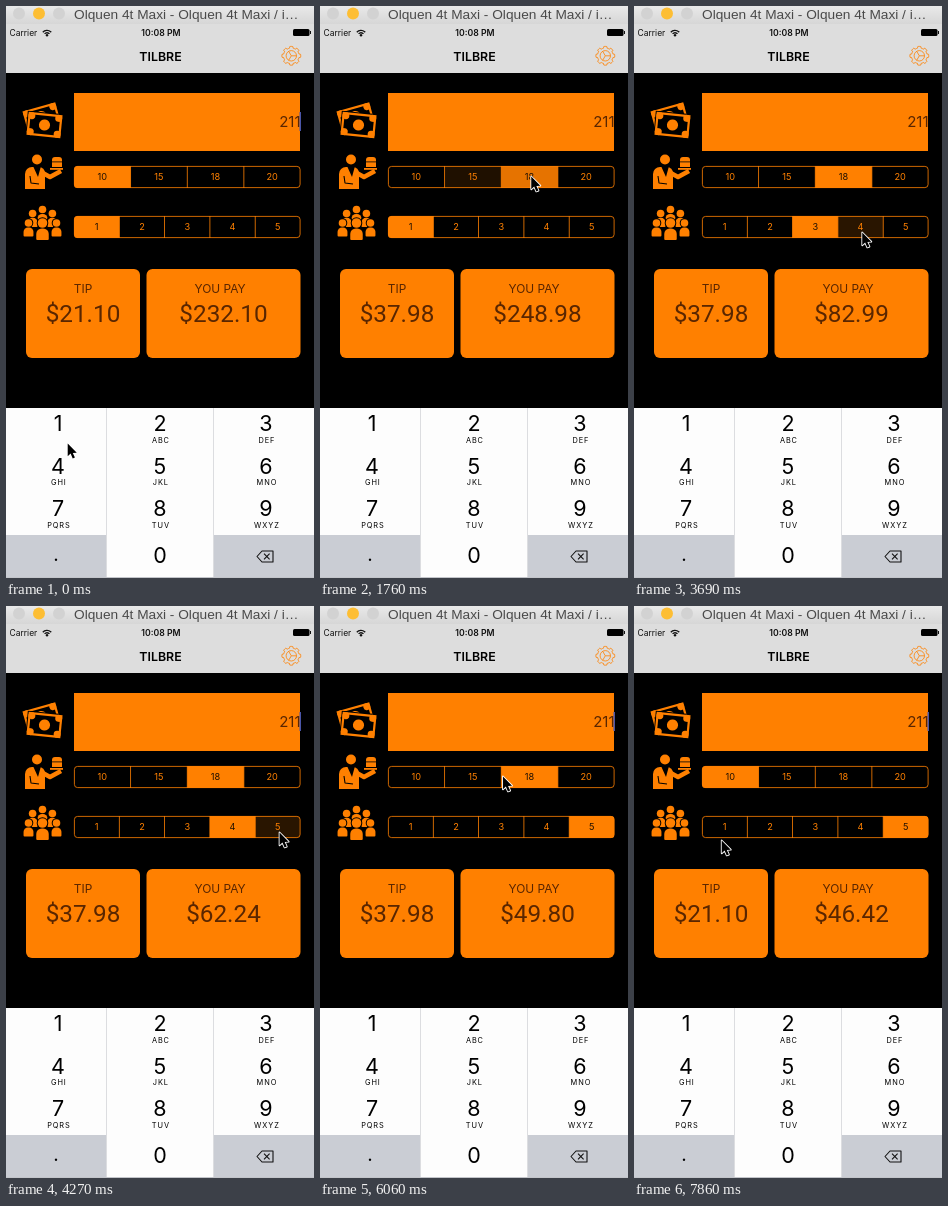
Recreate the animation shown at these times as an HTML page with a canvas. Size 308 px wide and 572 px high, loop 8000 ms.

```html
<!DOCTYPE html>
<html lang="en">
<head>
<meta charset="utf-8">
<title>Tip calculator</title>
<style>
html, body { margin: 0; width: 100%; height: 100%; overflow: hidden; background: #000; }
canvas { display: block; width: 308px; height: 572px; }
</style>
</head>
<body>
<canvas id="stage" width="308" height="572"></canvas>
<script>
const ctx = document.getElementById('stage').getContext('2d');
const TAU = Math.PI * 2;
const ORANGE = '#ff8000', BROWN = '#5a2600';
const SANS = 'Inter, Roboto, sans-serif';
const LOOP = 8000, STEPS = 54, BILL = 211;
const LEFT = 68, WIDTH = 226.5, CELL_H = 22;

const TIP = { y: 160, options: [10, 15, 18, 20] };
const SPLIT = { y: 210, options: [1, 2, 3, 4, 5] };
const START = { x: 61, y: 436 }, END = { x: 87, y: 233 };

// step of the press, control, chosen option; the release is one step later
const TAPS = [
  [6, TIP, 15], [11, TIP, 18], [16, SPLIT, 2], [21, SPLIT, 3], [25, SPLIT, 4],
  [29, SPLIT, 5], [34, TIP, 20], [39, TIP, 18], [43, TIP, 15], [47, TIP, 10]
];

function rect(x, y, w, h, color) {
  ctx.fillStyle = color;
  ctx.fillRect(x, y, w, h);
}

function round(x, y, w, h, r, color) {
  ctx.beginPath();
  ctx.roundRect(x, y, w, h, r);
  if (color) {
    ctx.fillStyle = color;
    ctx.fill();
  }
}

function disc(x, y, r, color = ORANGE) {
  ctx.beginPath();
  ctx.arc(x, y, r, 0, TAU);
  ctx.fillStyle = color;
  ctx.fill();
}

function trace(points) {
  ctx.beginPath();
  points.forEach(([x, y]) => ctx.lineTo(x, y));
}

function poly(points, color) {
  trace(points);
  ctx.closePath();
  ctx.fillStyle = color;
  ctx.fill();
}

function stroke(color, width) {
  ctx.strokeStyle = color;
  ctx.lineWidth = width;
  ctx.stroke();
}

function line(points, color, width) {
  trace(points);
  stroke(color, width);
}

function text(str, x, y, size, color, { weight = 400, align = 'center', family = SANS, gap = 0 } = {}) {
  ctx.font = `${weight} ${size}px ${family}`;
  ctx.letterSpacing = gap + 'px';
  ctx.textAlign = align;
  ctx.fillStyle = color;
  ctx.fillText(str, x, y);
}

function titleBar() {
  const g = ctx.createLinearGradient(0, 0, 0, 18);
  g.addColorStop(0, '#e9e9e9');
  g.addColorStop(1, '#d6d6d6');
  rect(0, 0, 308, 18, g);
  for (let i = 0; i < 3; i++) disc(13 + i * 20, 7.5, 6, i === 1 ? '#fdbe34' : '#d2d2d2');
  text('Olquen 4t Maxi - Olquen 4t Maxi / i…', 68, 13, 13.7, '#4a4a4a',
    { align: 'left', family: '"Liberation Sans", Arial, sans-serif' });
}

function statusBar() {
  rect(0, 18, 308, 49, '#dddddd');
  text('Carrier', 3.5, 30, 8.5, '#111', { align: 'left' });
  for (const r of [3.2, 5.6]) {
    ctx.beginPath();
    ctx.arc(41, 30, r, -TAU * 0.385, -TAU * 0.115);
    stroke('#111', 1.3);
  }
  disc(41, 29.3, 1.2, '#111');
  text('10:08 PM', 155, 30, 8.7, '#111', { weight: 600 });
  round(287, 23, 16.5, 7, 1.5, '#000');
  rect(304, 25, 1, 3, '#111');
  text('TILBRE', 154.5, 55, 12.4, '#000', { weight: 600 });
}

function gear() {
  const at = (r, a) => [285.3 + r * Math.cos(a), 49.8 + r * Math.sin(a)];
  const teeth = Array.from({ length: 161 }, (_, i) => {
    const a = i / 160 * TAU;
    return at(8.6 + 0.8 * Math.tanh(6 * Math.cos(a * 8)), a);
  });
  line(teeth, ORANGE, 0.9);
  ctx.beginPath();
  ctx.arc(285.3, 49.8, 5.2, 0, TAU);
  stroke(ORANGE, 0.8);
  for (let i = 0; i < 3; i++) line([at(0, 0), at(5.2, i * TAU / 3)], ORANGE, 0.8);
}

function note(x, y, w, h, turn) {
  ctx.save();
  ctx.translate(x, y);
  ctx.rotate(turn);
  rect(-w / 2 - 1, -h / 2 - 1, w + 2, h + 2, '#000');
  rect(-w / 2, -h / 2, w, h, ORANGE);
  rect(-w / 2 + 2.2, -h / 2 + 2.2, w - 4.4, h - 4.4, '#000');
  for (const sx of [-1, 1]) for (const sy of [-1, 1])
    disc(sx * (w / 2 - 3.5), sy * (h / 2 - 3.5), 3.5);
  disc(0, 0, 5.6);
  ctx.restore();
}

function waiter() {
  disc(31, 153.5, 5);
  round(19, 161, 20, 22, [7, 6, 0, 0], ORANGE);
  poly([[27, 160], [35, 160], [32, 171]], '#000');
  line([[24, 170], [25, 177], [33, 178]], '#000', 1.1);
  line([[35, 166], [44, 171], [55, 165]], ORANGE, 4.5);
  rect(44, 162, 13, 1.8, ORANGE);
  round(46, 151, 10, 10, [3, 3, 0, 0], ORANGE);
  rect(46, 155.5, 10, 0.8, '#000');
}

function person(x, y, r) {
  const w = r * 2.6, h = r * 2.4;
  round(x - w / 2 - 1.2, y + r - 0.6, w + 2.4, h + 1.2, w / 2, '#000');
  disc(x, y, r + 1, '#000');
  round(x - w / 2, y + r + 0.6, w, h, [w * 0.45, w * 0.45, 1, 1], ORANGE);
  disc(x, y, r);
}

function crowd() {
  // five people on an arc behind the one in front
  for (const a of [2, 1, 3, 0, 4])
    person(36.5 - 14 * Math.cos(a * TAU / 8), 217 - 13.5 * Math.sin(a * TAU / 8), 3.8);
  person(36.5, 217, 4.8);
}

const cellCenter = (control, i) => LEFT + (i + 0.5) * WIDTH / control.options.length;

function segments(control, fills) {
  const { y, options } = control, cell = WIDTH / options.length;
  ctx.save();
  round(LEFT, y, WIDTH, CELL_H, 3.5);
  ctx.clip();
  fills.forEach((a, i) => rect(LEFT + i * cell, y, cell, CELL_H, `rgba(255,128,0,${a})`));
  for (let i = 1; i < options.length; i++) rect(LEFT + i * cell - 0.4, y, 0.8, CELL_H, ORANGE);
  ctx.restore();
  round(LEFT + 0.4, y + 0.4, WIDTH - 0.8, CELL_H - 0.8, 3.2);
  stroke(ORANGE, 0.8);
  options.forEach((n, i) =>
    text(n, cellCenter(control, i), y + 14.3, 9.2, fills[i] > 0.5 ? '#201000' : ORANGE));
}

function card(x, w, label, labelX, value) {
  round(x, 263, w, 89, 6, ORANGE);
  text(label, labelX, 286.5, 11.9, BROWN);
  // Roboto has digits of equal width
  text('$' + value.toFixed(2), x + w / 2, 316, 24.3, BROWN, { family: 'Roboto, sans-serif' });
}

function keypad() {
  rect(0, 402, 308, 170, '#fdfdfd');
  rect(0, 529, 100, 43, '#cacdd4');
  rect(208, 529, 100, 43, '#cacdd4');
  for (const x of [100, 207]) rect(x, 402, 1, 170, '#dcdde0');
  rect(0, 571, 308, 1, '#c3c5ca');
  ' ABC DEF GHI JKL MNO PQRS TUV WXYZ'.split(' ').forEach((str, i) => {
    const x = [52, 154, 260][i % 3], y = 425 + Math.floor(i / 3) * 42.5;
    text(i + 1, x, y, 21.5, '#000');
    text(str, x + 0.9, y + 11.7, 7.4, '#000', { gap: 0.9 });
  });
  text('0', 154, 557, 21.5, '#000');
  text('.', 50, 555, 19, '#000');
  ctx.lineJoin = 'round';
  trace([[251, 550.5], [256, 545], [267, 545], [267, 556], [256, 556]]);
  ctx.closePath();
  stroke('#111', 1.1);
  for (const s of [-1, 1])
    line([[260.8 - 2.8, 550.5 - 2.8 * s], [260.8 + 2.8, 550.5 + 2.8 * s]], '#111', 1.1);
}

function pointer({ x, y }) {
  ctx.save();
  ctx.translate(x + 0.7, y + 1.5);
  ctx.scale(0.88, 0.88);
  ctx.lineJoin = 'round';
  trace([[0, 0], [0, 14.5], [3.3, 11.5], [5.7, 17], [8.2, 16], [5.8, 10.7], [10.3, 10.5]]);
  ctx.closePath();
  stroke('#fff', 2);
  ctx.fillStyle = '#000';
  ctx.fill();
  ctx.restore();
}

// rests on each tapped cell around its press, glides in between
function pointerAt(step) {
  let from = START, leave = 0;
  for (const [press, control, option] of TAPS) {
    const to = { x: cellCenter(control, control.options.indexOf(option)) + 1, y: control.y + 12 - 3 * (control === TIP) };
    if (control === SPLIT) to.y += 3;
    if (step < press) return glide(from, to, (step - leave) / (press - 1 - leave));
    from = to;
    leave = press + 1;
  }
  return glide(from, END, (step - leave) / (STEPS - 1 - leave));
}

function glide(a, b, t) {
  const k = Math.min(1, Math.max(0, t)), e = k * k * (3 - 2 * k);
  return { x: a.x + (b.x - a.x) * e, y: a.y + (b.y - a.y) * e };
}

function controlAt(control, step) {
  const { options } = control;
  let value = options[0];
  let fills = options.map((_, i) => i ? 0 : 1);
  for (const [press, owner, option] of TAPS) {
    if (owner !== control || step < press) continue;
    const i = options.indexOf(option);
    if (step === press) {
      fills[i] = 0.16;
      continue;
    }
    const fading = step === press + 1;
    fills = options.map(n => fading && n === value ? 0.12 : 0);
    fills[i] = fading ? 0.9 : 1;
    value = option;
  }
  return { value, fills };
}

function draw(time) {
  // the screen refreshes in held steps
  const step = Math.min(STEPS - 1, Math.floor((time % LOOP + 30) * STEPS / LOOP));
  const rate = controlAt(TIP, step), split = controlAt(SPLIT, step);
  const tip = BILL * rate.value / 100;
  const blink = step * LOOP / STEPS / 1000 % 1;

  rect(0, 0, 308, 572, '#000');
  titleBar();
  statusBar();
  gear();
  note(35.5, 110.5, 34, 20, -0.27);
  note(38.5, 119, 34, 23, 0.1);
  waiter();
  crowd();

  rect(LEFT, 87, 226, 58, ORANGE);
  text(BILL, 294.5, 121, 15, BROWN, { align: 'right' });
  if (blink < 0.34 || blink > 0.81) rect(293.5, 106, 1.5, 19, '#4a55a8');

  segments(TIP, rate.fills);
  segments(SPLIT, split.fills);
  card(20, 114, 'TIP', 77, tip);
  card(140.5, 154, 'YOU PAY', 214, (BILL + tip) / split.value);
  keypad();
  pointer(pointerAt(step));
}

const start = performance.now();
function tick() {
  draw(performance.now() - start);
  requestAnimationFrame(tick);
}
tick();
</script>
</body>
</html>
```
